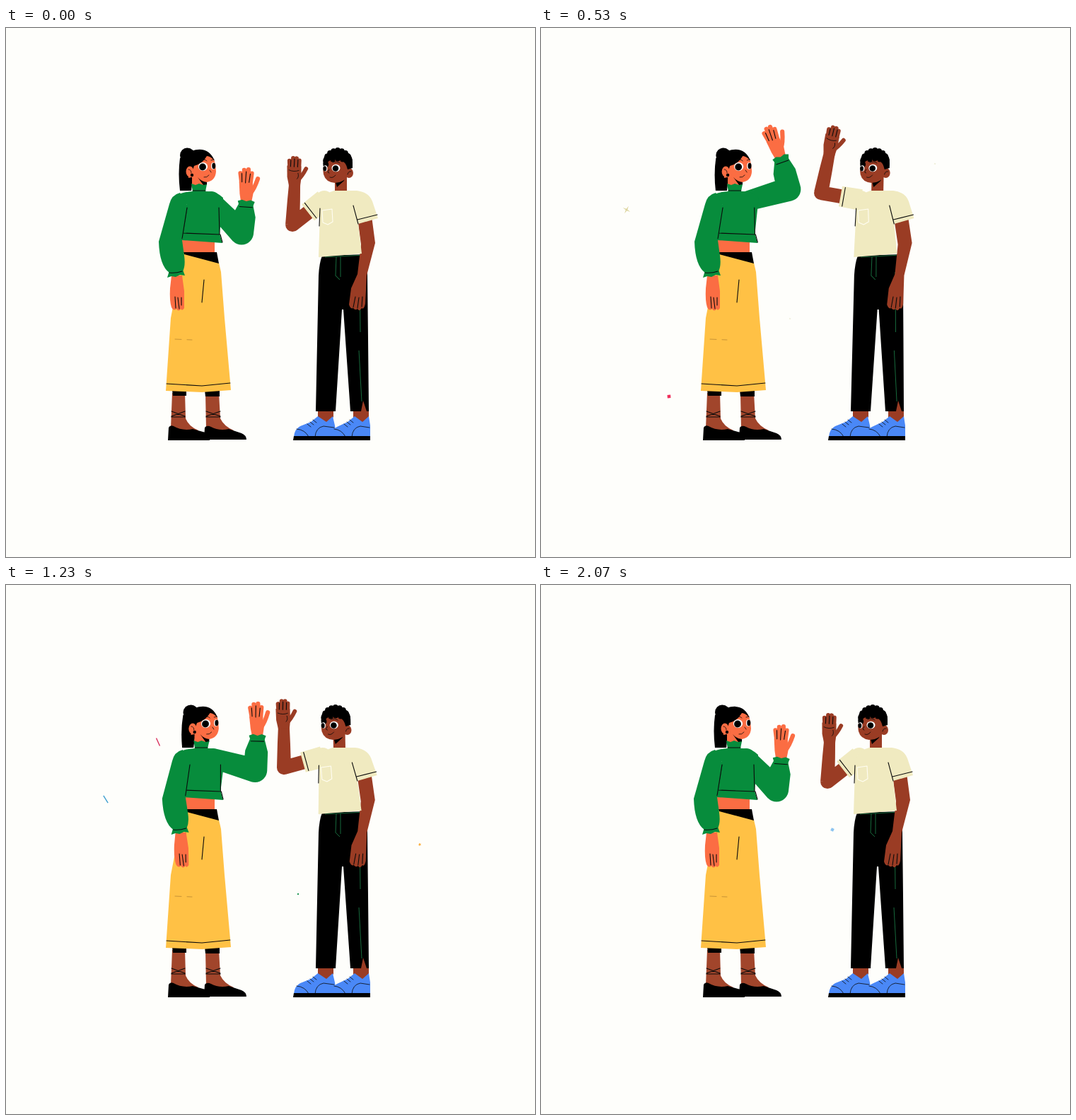
Animation of 748 by 748 pixels, one loop 2.13 s. Source, as an HTML page:

```html
<!DOCTYPE html>
<html lang="en">
<head>
<meta charset="utf-8">
<title>High five</title>
<style>
  html, body { margin: 0; width: 100%; height: 100%; overflow: hidden; background: #fefefb; }
  svg { display: block; width: 100vw; height: 100vh; }
  .line { fill: none; stroke: #0b0b0b; stroke-width: 1.1; stroke-linecap: round; stroke-linejoin: round; }
  .thin { stroke-width: .8; }
  .seam { fill: none; stroke: #17693c; stroke-width: 1; }
  .green { fill: #078c3c; }
  .peach { fill: #fb6d43; }
  .brown { fill: #9a3c24; }
  .cream { fill: #f0eac0; }
  .gold { fill: #ffc145; }
  .blue { fill: #4a88f7; }
  .finger { fill: none; stroke-linecap: round; }
  .peach.finger { stroke: #fb6d43; fill: none; stroke-width: 6.2; }
  .brown.finger { stroke: #9a3c24; fill: none; stroke-width: 5.8; }
  .white { fill: #fff; }
</style>
</head>
<body>
<svg viewBox="0 0 748 748">
  <!-- woman -->
  <g>
    <path fill="#a1452b" d="M235 516H253L254 552Q258 563 272 569L250 574 233 566ZM282 516H301L303 552Q308 563 322 569L300 574 283 566Z"/>
    <path d="M235 512H255V520H236ZM281 512H302V521H282Z"/>
    <path class="line" d="M234 542 253 549M234 549 253 542M234 550H253M283 542 303 549M283 549 303 542M283 550H303"/>
    <path d="M230 565Q232 561 237 563 249 570 264 567L282 572Q288 576 288 583H229ZM281 565Q284 561 290 564 301 570 315 567L333 573Q340 576 340 582H280Z"/>
  </g>
  <g id="skirt">
    <path class="peach" d="M249 298H295V320H249Z"/>
    <path class="gold" d="M251 318 301 332 304 345 309 410 318 512 277 515 226 513 233 410Z"/>
    <path d="M251 317H298L301 333 252 320Z"/>
    <path class="line" d="M227 503 277 506 317 502M280 356 277 388"/>
    <path class="line thin" stroke-dasharray="9 8" style="stroke:#b98732" d="M239 440 263 441"/>
  </g>
  <path id="sleeveW" class="green"/>
  <g id="handW">
    <path class="peach" d="M-12-31H7L9-16 7 0H-7L-10-14Z"/>
    <path class="peach finger" d="M-8-28-11-43M-4-28-6-48M1-28 0-49M4-28 5-44M5-16Q10-22 14-37"/>
    <path class="line" d="M-8-31-9-43M-3-30-3-46M2-31 3-43"/>
    <path class="green" d="M-12-4-6-6 0-4 6-6 12-4 9 5H-9Z"/>
    <path class="line" d="M-9 4H9"/>
  </g>
  <g id="bodyW">
    <path d="M246 184Q243 206 246 230L262 230 266 195 259 178Z"/>
    <circle cx="256.500" cy="180" r="10.500"/>
    <path class="peach" d="M263 205H283V224H263Z"/>
    <path class="peach" d="M257 190Q262 178 284 177 294 180 296 193L297 203Q296 216 284 218 272 218 267 210L258 212Z"/>
    <path d="M271 211Q276 217 284 218L284 222H279Z"/>
    <path d="M253 204Q248 181 262 174 286 166 295 188 289 181 284 181 278 192 266 195L263 204 258 198Z"/>
    <ellipse class="peach" cx="260" cy="203" rx="5.500" ry="7.500"/>
    <path class="line thin" d="M258 200Q262 200 262 205"/>
    <circle cx="263" cy="208" r="2.200"/>
    <ellipse class="white" cx="278.500" cy="196" rx="6.600" ry="6"/>
    <ellipse class="white" cx="293" cy="195" rx="3" ry="4.800"/>
    <circle cx="278" cy="196.500" r="4.900"/>
    <ellipse cx="293.800" cy="195" rx="2.500" ry="4.200"/>
    <path class="line thin" d="M280 211Q284 212 287 208M275 187Q280 184 284 188M290 187 294 186M288 201 290 204"/>
    <path class="green" d="M262 220 268 222 273 220 279 222 284 221 282 231Q297 230 307 240L302 291 306 304 249 300 250 290 256 250 238 239Q246 232 264 231Z"/>
    <path class="line" d="M264 230H282M250 290 303 292 306 303M256 254 250 290M301 254 302 291"/>
  </g>
  <g id="armW">
    <path class="peach" d="M234 350H249L252 372V396Q249 401 247 397 244 402 241 397 237 401 234 395 231 386 232 368Z"/>
    <path class="line" d="M239 380 240 396M243 381 245 397M248 381 248 392"/>
    <path class="green" d="M246 233Q234 236 231 249L216 302Q217 336 231 346L250 344Q254 336 252 322L249 300 257 252Z"/>
    <path class="green" d="M231 343 250 342 253 350 246 349 240 352 234 351 228 353Z"/>
    <path class="line" d="M231 346Q240 347 249 344M256 254 249 298"/>
  </g>

  <!-- man -->
  <g>
    <path class="brown" d="M441 538H463V550L453 560 441 552ZM491 538H513V550L503 560 491 552Z"/>
    <path class="blue" d="M407 578Q408 567 416 563L431 557 441 549 453 557 462 549 465 562 467 578Z"/>
    <path class="blue" d="M459 578Q461 567 468 564L483 557 493 549 504 557 513 549 515 562V578Z"/>
    <path class="line thin" d="M426 560 431 564M430 557 435 561M434 554 439 558M437 578Q438 565 449 563L464 565M478 560 483 564M482 557 487 561M486 554 491 558M489 578Q490 565 501 563L514 565M411 567Q423 568 428 578M464 567Q475 568 480 578"/>
    <path d="M407 577H515V583H406Z"/>
  </g>
  <g id="pants">
    <path d="M447 322 510 320 511 350 512 440 513 542H487L477 398H475L466 542H438L442 350Q443 332 447 322Z"/>
    <path class="brown" d="M505 527 510 542H502Z"/>
    <path class="seam" d="M451 324 508 321M467 323 466 350 472 356M473 323V352M500 345 501 430M499 456 503 528"/>
  </g>
  <path id="limbM" class="brown"/>
  <g id="handM">
    <path class="brown" d="M-12-26H8L9-11 8 2H-8L-11-10Z"/>
    <path class="brown finger" d="M-8-22-9-33M-4-22-4-37M1-22 1-37M5-22 5-34M4-6Q10-12 15-23"/>
    <path class="line" d="M-7-25-7-34M-2-25-2-36M3-25 3-35"/>
    <path class="line thin" d="M-9-20Q-2-17 5-20M4-16Q6-11 3-8"/>
  </g>
  <g id="armM">
    <path class="brown" d="M497 268 517 266 522 304 510 350 508 390Q506 399 503 396 500 402 497 397 494 400 491 396 487 398 485 391L488 368 497 348 502 306Z"/>
    <path class="line" d="M494 380 491 395M499 381 497 396M504 380 503 394"/>
  </g>
  <path id="sleeveM" class="cream"/>
  <path id="hemM" class="line"/>
  <g id="bodyM">
    <path class="brown" d="M465 205H482V233H465Z"/>
    <path class="cream" d="M464 230H496Q513 232 518 245L526 269 498 277 503 319 442 324 444 262 446 244Q452 233 464 230Z"/>
    <path class="line" d="M491 251 498 277M497 271 525 264M444 255 443 280"/>
    <path class="line" style="stroke:#fffdf2" d="M447 258 461 256 462 274 455 278 448 275Z"/>
    <path d="M466 218Q474 217 479 211L478 216 468 225Z"/>
    <path class="brown" d="M452 186H484V207Q480 218 465 219 452 218 449 207 447 196 452 186Z"/>
    <ellipse class="brown" cx="485" cy="205" rx="6" ry="7"/>
    <path class="line thin" d="M483 207Q484 202 488 203"/>
    <path d="M448.500 192Q447 174 469 173 490 173 490 190V198L483 200Q481 190 474 187 460 183 448.500 192Z"/>
    <g id="curls"></g>
    <ellipse class="white" cx="466.500" cy="198" rx="6" ry="5.300"/>
    <ellipse class="white" cx="451.500" cy="198.500" rx="3" ry="4.300"/>
    <circle cx="466" cy="198.500" r="4.300"/>
    <ellipse cx="450.800" cy="198.800" rx="2.500" ry="3.600"/>
    <path class="line thin" d="M458 211Q462 213 466 208M462 190Q468 188 472 191M449 191 453 190M457 200 455 204 457 205"/>
  </g>
  <g id="burst" fill="none" stroke-width="1.200"></g>
  <g id="bits"></g>
</svg>
<script>
const LOOP = 2130;
const TIMES = [0, 270, 530, 640, 1110, 1400, 1750, LOOP];

// Values at rest, wind-up, swing, clap and overshoot.
const POSES = {
  leanW: [0, -.07, .008, .045, 0],
  skirt: [0, -3, 0, 0, 0],
  armTopW: [0, -9, 1, 6, 0],
  armEndW: [0, -2, 1, 9, 0],
  upperW: [46, -8, -16, -4, 49],
  foreW: [-81, -100, -104, -88, -82],
  lenW: [41, 46, 43, 47, 42],
  palmW: [4, -15, -19, 0, 3],
  leanM: [0, .085, .02, -.03, 0],
  pants: [0, 2, 1, 0, 0],
  armTopM: [0, 7, 2, -1, 0],
  armEndM: [0, 7, 4, 1, 0],
  upperM: [142, 201, 190, 180, 139],
  foreM: [-87, -57, -78, -92, -87],
  palmM: [3, 27, 14, 0, 3]
};

const NS = 'http://www.w3.org/2000/svg';
const $ = id => document.getElementById(id);
const clamp = v => Math.max(0, Math.min(1, v));
const move = (id, value) => $(id).setAttribute('transform', value);
const draw = (id, d) => $(id).setAttribute('d', d);

function add(parent, tag, attrs) {
  const node = document.createElementNS(NS, tag);
  for (const key in attrs) node.setAttribute(key, attrs[key]);
  return parent.appendChild(node);
}

// Monotone cubic through the poses, flat at every turning point.
function poseAt(name, t) {
  const [rest, wind, swing, clap, over] = POSES[name];
  const v = [rest, wind, swing, clap, clap, over, rest, rest];
  const slope = i => (v[i + 1] - v[i]) / (TIMES[i + 1] - TIMES[i]);
  const tangent = i => {
    if (i === 0 || i === v.length - 1) return 0;
    const a = slope(i - 1), b = slope(i);
    return a * b <= 0 ? 0 : 2 * a * b / (a + b);
  };
  let i = 0;
  while (i < v.length - 2 && t >= TIMES[i + 1]) i++;
  const h = TIMES[i + 1] - TIMES[i], u = (t - TIMES[i]) / h, w = 1 - u;
  return v[i] * (1 + 2 * u) * w * w + v[i + 1] * u * u * (3 - 2 * u)
    + h * u * w * (tangent(i) * w - tangent(i + 1) * u);
}

const polar = (p, angle, len) => {
  const a = angle * Math.PI / 180;
  return [p[0] + Math.cos(a) * len, p[1] + Math.sin(a) * len];
};
const mix = (p, q, k) => [p[0] + (q[0] - p[0]) * k, p[1] + (q[1] - p[1]) * k];

// Sideways shift that runs from dx0 at y0 to dx1 at y1.
function shear(dx0, dx1, y0, y1) {
  const k = (dx1 - dx0) / (y1 - y0);
  return `matrix(1 0 ${k} 1 ${dx0 - k * y0} 0)`;
}
const lean = k => shear(k * 340, 0, 0, 340);

function side(p, q, at, r) {
  const len = Math.hypot(q[0] - p[0], q[1] - p[1]);
  const nx = (p[1] - q[1]) / len * r, ny = (q[0] - p[0]) / len * r;
  return [[at[0] + nx, at[1] + ny], [at[0] - nx, at[1] - ny]];
}
function bone(p, q, rp, rq) {
  const [a, b] = side(p, q, p, rp), [c, d] = side(p, q, q, rq);
  return `M${a}L${c}L${d}L${b}Z`;
}
const disc = ([x, y], r) => `M${x - r} ${y}a${r} ${r} 0 1 0 ${2 * r} 0a${r} ${r} 0 1 0 ${-2 * r} 0Z`;

// Two bones whose forearm keeps its width until 60% of its length.
function limb(s, e, w, rs, re, rm, rw) {
  const m = mix(e, w, .6);
  return bone(s, e, rs, re) + bone(e, m, re, rm) + bone(m, w, rm, rw) + disc(e, re) + disc(s, rs);
}

for (let i = 0; i < 11; i++) {
  const [cx, cy] = polar([469, 190], 170 + i * 20, 17);
  add($('curls'), 'circle', { cx, cy, r: 3.9 });
}
for (let i = 0; i < 4; i++) add($('curls'), 'circle', { cx: 455 + i * 7, cy: 185 + (i % 2), r: 3.6 });

// Burst: start x, y and end x, y of each ray.
const RAYS = [
  [357, 131, 353, 125, '#4a4a20'], [343, 142, 338, 139, '#222'],
  [337, 154, 328, 151, '#222'], [338, 175, 330, 179, '#2c3c9a'],
  [394, 136, 400, 127, '#2c3c9a'], [397, 141, 402, 137, '#4a4a20'],
  [411, 156, 420, 158, '#222'], [410, 172, 419, 177, '#2c3c9a']
].map(([x0, y0, x1, y1, stroke]) => ({ a: [x0, y0], b: [x1, y1], node: add($('burst'), 'path', { stroke }) }));

function drawBurst(t) {
  const p = (t - 640) / 267, on = p > 0 && p < 1;
  $('burst').setAttribute('visibility', on ? 'visible' : 'hidden');
  if (!on) return;
  const inner = 1 - 2.5 * (1 - p);
  const outer = Math.max(inner, 1 - 1.5 * Math.pow(1 - clamp(p / .5), 2));
  for (const { a, b, node } of RAYS) node.setAttribute('d', `M${mix(a, b, inner)}L${mix(a, b, outer)}`);
}

const starPath = (points, out, inn) => 'M' + Array.from({ length: points * 2 }, (_, i) =>
  polar([0, 0], -90 + i * 180 / points, i % 2 ? inn : out)).join('L') + 'Z';
const SHAPES = {
  spark: starPath(4, 6, 1.3),
  star: starPath(5, 5.5, 2.8),
  square: 'M-2.3-2.3H2.3V2.3H-2.3Z',
  dot: disc([0, 0], 2),
  line: 'M-6-.7H6V.7H-6Z',
  curl: 'M-5 3Q-1 5 0 1T5-4'
};

// Confetti: shape, colour, x, y, start, end, first angle, last angle, size.
const BITS = [
  ['spark', '#dcd49c', 121, 257, 190, 660, 0, 40, 1],
  ['curl', '#3f7fd0', 205, 308, 120, 420, -20, 20, 1],
  ['spark', '#d9d6b0', 352, 411, 60, 570, 0, 80, .8],
  ['square', '#f0305c', 181, 521, 440, 680, -20, 20, 1],
  ['spark', '#d8d9a8', 557, 192, 500, 1040, -20, 20, 1.1],
  ['line', '#d9c520', 175, 227, 640, 960, -42, -38, 1],
  ['line', '#d8305c', 215, 222, 770, 1400, 10, -160, 1],
  ['line', '#3f9fd0', 141, 303, 1000, 1720, 10, 160, 1],
  ['square', '#0f9048', 413, 437, 960, 1260, -10, 20, 1],
  ['dot', '#e0305c', 383, 379, 1260, 1560, 0, 0, 1],
  ['star', '#fbb040', 585, 367, 1180, 1700, -30, 40, 1],
  ['star', '#fbb040', 202, 505, 1320, 1640, -20, 40, .85],
  ['square', '#8cc4f0', 412, 346, 1900, 2120, -20, 40, 1]
].map(([shape, color, x, y, from, to, a0, a1, size]) => {
  const paint = shape === 'curl' ? { fill: 'none', stroke: color } : { fill: color };
  return { x, y, from, to, a0, a1, size, node: add($('bits'), 'path', { d: SHAPES[shape], ...paint }) };
});

function drawBits(t) {
  for (const b of BITS) {
    const p = clamp((t - b.from) / (b.to - b.from));
    const k = Math.min(1, 1.4 * Math.sin(Math.PI * p)) * b.size;
    b.node.setAttribute('visibility', k > .02 ? 'visible' : 'hidden');
    b.node.setAttribute('transform',
      `translate(${b.x} ${b.y}) rotate(${b.a0 + (b.a1 - b.a0) * p}) scale(${k})`);
  }
}

function drawWoman(v) {
  move('bodyW', lean(v.leanW));
  move('skirt', shear(v.skirt, 0, 318, 512));
  move('armW', shear(v.armTopW, v.armEndW, 235, 350));
  const s = [290 + v.leanW * 95, 245];
  const e = polar(s, v.upperW, 62);
  const w = polar(e, v.foreW, v.lenW);
  draw('sleeveW', limb(s, e, w, 14, 17, 16, 10));
  move('handW', `translate(${w}) rotate(${v.palmW})`);
}

function drawMan(v) {
  move('bodyM', lean(v.leanM));
  move('pants', shear(v.pants, 0, 322, 542));
  move('armM', shear(v.armTopM, v.armEndM, 270, 380));
  const s = [450 + v.leanM * 110, 243];
  const e = polar(s, v.upperM, 57);
  const w = polar(e, v.foreM, 57);
  draw('limbM', limb(s, e, w, 10, 10, 9, 8));
  const end = mix(s, e, .51), hem = mix(s, e, .43);
  draw('sleeveM', bone(s, end, 15, 14.5) + disc(s, 13));
  draw('hemM', `M${side(s, e, hem, 13.5).join('L')}`);
  move('handM', `translate(${w}) rotate(${v.palmM})`);
}

function render(t) {
  const v = {};
  for (const name in POSES) v[name] = poseAt(name, t);
  drawWoman(v);
  drawMan(v);
  drawBurst(t);
  drawBits(t);
}

function tick() {
  render(performance.now() % LOOP);
  requestAnimationFrame(tick);
}
tick();
</script>
</body>
</html>
```
